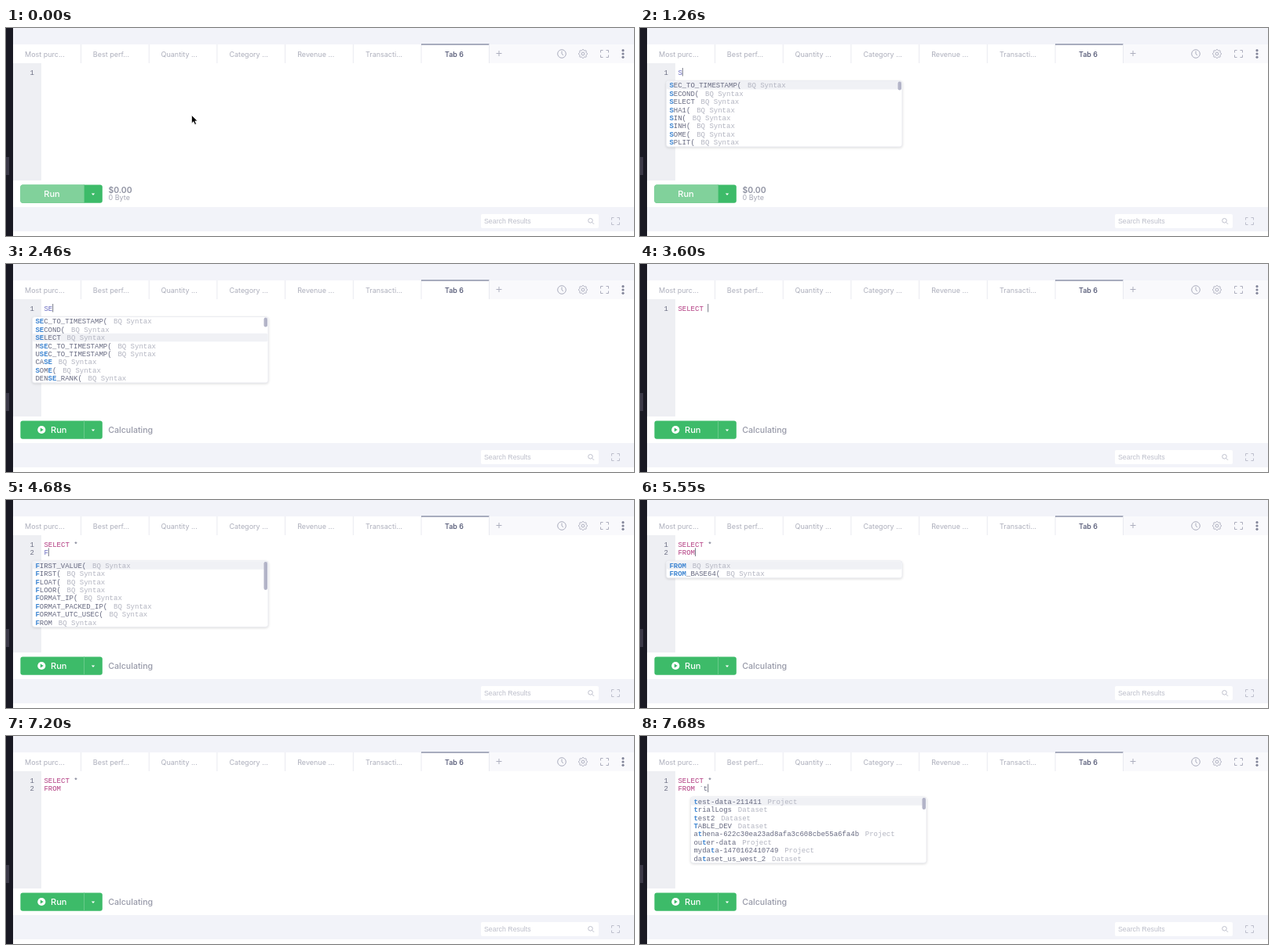
These frames come from a looping animation (800x266 px, 8000 ms). An HTML page:

```html
<!DOCTYPE html>
<html lang="en">
<head>
<meta charset="utf-8">
<title>Query editor</title>
<style>
  html, body { margin: 0; width: 100%; height: 100%; overflow: hidden; background: #fff; }
  svg { display: block; width: 800px; height: 266px; }
  text { font-family: Inter, sans-serif; white-space: pre; }
  .tab { font-size: 9px; fill: #adafbc; }
  .mono text { font: 9px "Liberation Mono", monospace; fill: #666980; }
  .mono .number { fill: #6d7084; }
  .mono .keyword { fill: #b23a80; }
  .mono .partial { fill: #6a6cc0; }
  .mono .match { fill: #3f86d2; font-weight: bold; }
  .mono .kind { fill: #b3b5c1; }
  .line { fill: none; stroke: #acaebe; }
  .faint { stroke: #bdbfcc; }
  .panel { fill: #fff; stroke: #ebecf1; filter: drop-shadow(0 1px 1.5px #0002); }
</style>
</head>
<body>
<svg viewBox="0 0 800 266">
  <rect width="800" height="266" fill="#fff"/>
  <path d="M9 0H800V21H9zM9 229H800V260H9z" fill="#f2f3f9"/>
  <rect x="616" y="21" width="184" height="24" fill="#f9f9fc"/>
  <rect width="9" height="266" fill="#191923"/>
  <rect y="165" width="4" height="23" fill="#3b3947"/>
  <rect x="9" y="45" width="36" height="150" fill="#eeeff3"/>
  <g id="tabs"></g>
  <rect x="529" y="20.5" width="86.5" height="1" fill="#596080"/>
  <path d="M615.5 21V45" stroke="#e9eaf0"/>
  <text x="559" y="37" class="tab" style="fill:#4d5270;font-weight:500">Tab 6</text>
  <g class="line">
    <path d="M624.5 32.5h7M628 29v7"/>
    <circle cx="708" cy="33" r="5.3"/>
    <path d="M708 29.5V33l2 2"/>
    <circle cx="735" cy="33" r="1.9"/>
    <path id="gear"/>
    <path id="corners" d="M757.5 31.5v-3h3M764.5 28.5h3v3M767.5 34.5v3h-3M760.5 37.5h-3v-3"/>
    <use href="#corners" x="14" y="214" class="faint"/>
  </g>
  <g fill="#83869a">
    <circle cx="786" cy="28.7" r="1.6"/><circle cx="786" cy="33" r="1.6"/><circle cx="786" cy="37.3" r="1.6"/>
  </g>
  <rect x="605" y="238" width="150" height="18" rx="2" fill="#fff"/>
  <text x="609" y="249.5" fill="#bcbeca" style="font:8.8px 'Liberation Sans',sans-serif">Search Results</text>
  <g class="line faint"><circle cx="744.5" cy="246.3" r="2.8"/><path d="M746.6 248.4l2.4 2.4"/></g>

  <rect x="18.4" y="200.4" width="104.4" height="23.4" rx="3" fill="#3dbb69"/>
  <path id="dim" d="M99 200.4H21.4a3 3 0 0 0-3 3v17.4a3 3 0 0 0 3 3H99z" fill="#81d19b"/>
  <path d="M99.5 200.4v23.4" stroke="#68ca89"/>
  <path d="M108.8 211.5h4.4l-2.2 2.6z" fill="#fff"/>
  <text id="run" y="216" fill="#fff" font-size="11" font-weight="500">Run</text>
  <g id="busy">
    <circle cx="45.3" cy="212" r="5.1" fill="#fff"/>
    <path d="M43.8 209.4v5.2l4-2.6z" fill="#3dbb69"/>
    <text x="130.3" y="216.3" font-size="10.6" font-weight="500" fill="#9799a8">Calculating</text>
  </g>
  <g id="cost" fill="#8d90a0">
    <text x="130.5" y="210.5" font-size="10.4" font-weight="600">$0.00</text>
    <text x="130.5" y="220.3" font-size="9" fill="#a4a6b4">0 Byte</text>
  </g>
  <g id="editor" class="mono"></g>
  <path id="mouse" d="M236.5 111.5v10.4l2.4-2.2 1.7 3.8 1.9-.8-1.7-3.8h3.2z" fill="#000" stroke="#fff" stroke-width=".7"/>
</svg>
<script>
const LOOP = 8000, BLINK = 720, CHAR = 5.4, ROW = 10.43, BUSY_AT = 2010;
const $ = id => document.getElementById(id);
const show = (id, on) => $(id).style.display = on ? '' : 'none';
const text = (x, y, body, cls = '') => `<text x="${x}" y="${y}" class="${cls}">${body}</text>`;
const span = (cls, body) => `<tspan class="${cls}">${body}</tspan>`;

$('tabs').innerHTML = ['Most purc', 'Best perf', 'Quantity ', 'Category ', 'Revenue ', 'Transacti'].map((name, i) =>
  text(24 + i * 86.8, 37, name + '...', 'tab') +
  `<path d="M${95.5 + i * 86.7} 21V45" stroke="#e9eaf0"/>`).join('');

// Gear outline: a circle whose radius ripples eight times
$('gear').setAttribute('d', 'M' + Array.from({ length: 64 }, (_, i) => {
  const a = i * Math.PI / 32, r = 5 + 0.7 * Math.cos(8 * a);
  return `${(735 + r * Math.cos(a)).toFixed(2)} ${(33 + r * Math.sin(a)).toFixed(2)}`;
}).join('L') + 'z');

const syntax = names => names.split(' ').map(n => [n, 'BQ Syntax']);
const lists = {
  S: { items: syntax('SEC_TO_TIMESTAMP( SECOND( SELECT SHA1( SIN( SINH( SOME( SPLIT('), thumb: 11 },
  SE: { items: syntax('SEC_TO_TIMESTAMP( SECOND( SELECT MSEC_TO_TIMESTAMP( USEC_TO_TIMESTAMP( CASE SOME( DENSE_RANK('), thumb: 12 },
  F: { items: syntax('FIRST_VALUE( FIRST( FLOAT( FLOOR( FORMAT_IP( FORMAT_PACKED_IP( FORMAT_UTC_USEC( FROM'), thumb: 36 },
  FR: { items: syntax('FROM FROM_BASE64('), thumb: 0 },
  tables: {
    items: [['test-data-211411', 'Project'], ['trialLogs', 'Dataset'], ['test2', 'Dataset'], ['TABLE_DEV', 'Dataset'],
      ['athena-622c30ea23ad8afa3c608cbe55a6fa4b', 'Project'], ['outer-data', 'Project'],
      ['mydata-1470162410749', 'Project'], ['dataset_us_west_2', 'Dataset']],
    thumb: 15, left: 64.5
  }
};

// [time, code, list, matched part, selected row]
const steps = [
  [30, ''],
  [1230, 'S', 'S', 'S'],
  [1620, 'SE', 'SE', 'SE'],
  [2100, 'SE', 'SE', 'SE', 1],
  [2400, 'SE', 'SE', 'SE', 2],
  [2700, 'SELECT'],
  [2970, 'SELECT '],
  [3930, 'SELECT *'],
  [4170, 'SELECT *\n'],
  [4680, 'SELECT *\nF', 'F', 'F'],
  [4860, 'SELECT *\nFR', 'FR', 'FR'],
  [4980, 'SELECT *\nFRO', 'FR', 'FRO'],
  [5130, 'SELECT *\nFROM', 'FR', 'FROM'],
  [5580, 'SELECT *\nFROM'],
  [6120, 'SELECT *\nFROM '],
  [7290, 'SELECT *\nFROM `', 'tables', ''],
  [7590, 'SELECT *\nFROM `t', 'tables', 't']
];

function codeLine(line, i) {
  const y = 59.5 + i * ROW;
  const body = line.replace(/[A-Z]+/g, word =>
    span(/^(SELECT|FROM)$/.test(word) ? 'keyword' : 'partial', word));
  return text(30.5, y, i + 1, 'number') + text(48.4, y, body);
}

// Marks the typed part, or its letters one by one where they are apart
function highlight(label, part) {
  if (!part) return label;
  const whole = label.toLowerCase().includes(part.toLowerCase());
  let rest = label, out = '';
  for (const piece of whole ? [part] : part) {
    const at = rest.toLowerCase().indexOf(piece.toLowerCase()), end = at + piece.length;
    out += rest.slice(0, at) + span('match', rest.slice(at, end));
    rest = rest.slice(end);
  }
  return out + rest;
}

function popup(name, part, row, lineNo) {
  const { items, thumb, left = 33.5 } = lists[name];
  const top = 67.5 + lineNo * ROW, height = items.length * ROW + 1;
  let out = `<rect class="panel" x="${left}" y="${top}" width="300.5" height="${height}" rx="3"/>` +
    `<rect x="${left + .5}" y="${top + .5 + row * ROW}" width="299.5" height="${ROW}" rx="2" fill="#f0f1f5"/>`;
  items.forEach(([label, kind], i) => {
    const x = left + 3.9, y = top + 8.8 + i * ROW;
    out += text(x, y, highlight(label, part)) + text(x + label.length * CHAR + 7.8, y, kind, 'kind');
  });
  if (thumb) out += `<rect x="${left + 295}" y="${top + 1}" width="4.5" height="${thumb}" rx="2.2" fill="#b3b4c8"/>`;
  return out;
}

const start = performance.now();
let last;
function frame(now) {
  const t = Math.max(0, now - start) % LOOP;
  const [time, code, list, part, row = 0] = steps.findLast(s => s[0] <= t) || [-LOOP, ''];
  const caretOn = t - time < BLINK, busy = t >= BUSY_AT;
  const key = [time, caretOn, busy].join();
  if (key !== last) {
    last = key;
    const lines = code.split('\n'), n = lines.length - 1;
    let out = lines.map(codeLine).join('');
    if (caretOn) out += `<rect x="${48.4 + lines[n].length * CHAR}" y="${51 + n * ROW}" width="1" height="10.5" fill="#777a88"/>`;
    if (list) out += popup(list, part, row, n);
    $('editor').innerHTML = out;
    $('run').setAttribute('x', busy ? 57 : 48.3);
    show('busy', busy);
    show('dim', !busy);
    show('cost', !busy);
    show('mouse', t < 1230);
  }
  requestAnimationFrame(frame);
}
frame(start);
</script>
</body>
</html>
```
